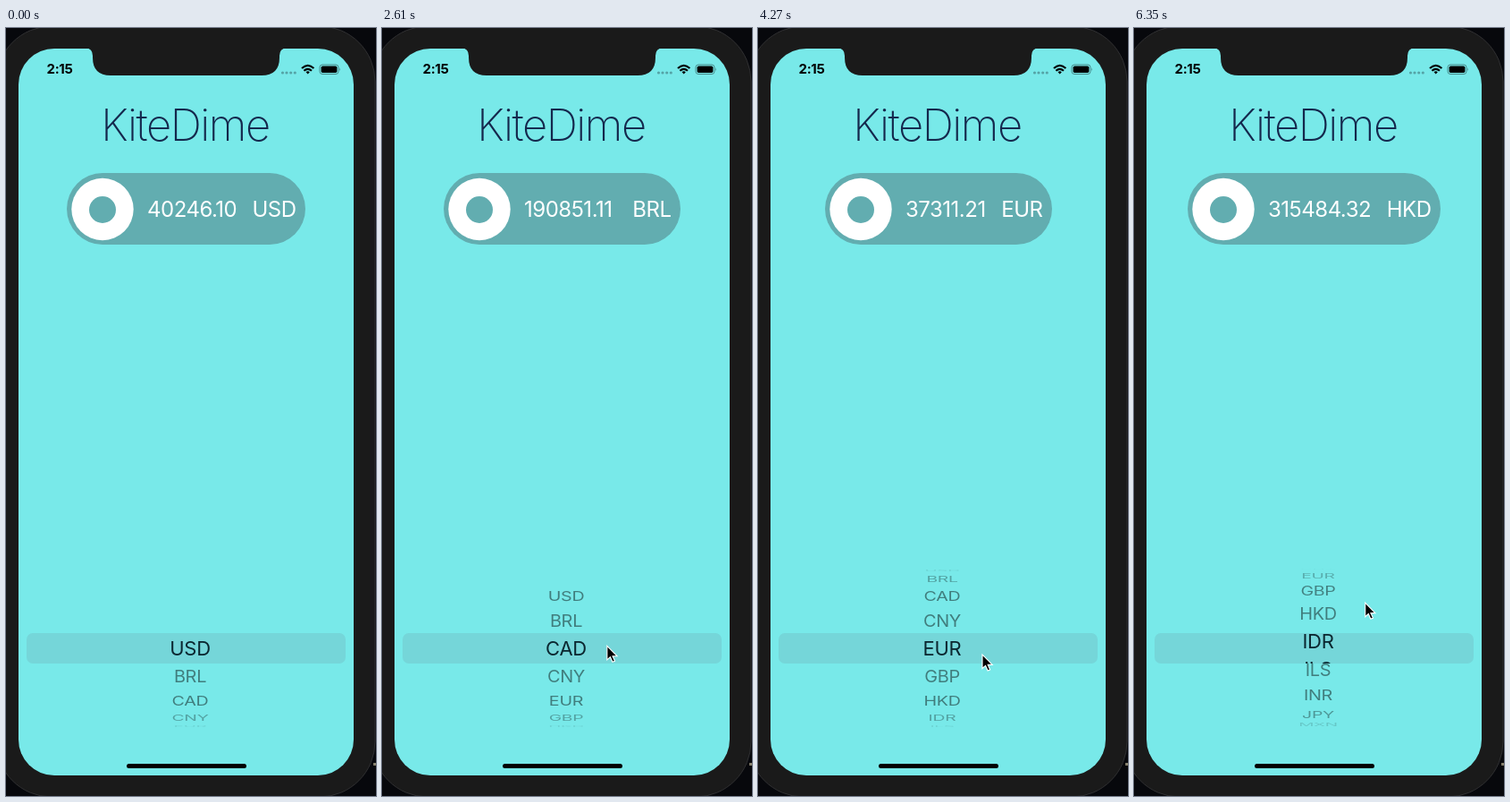
These frames come from a looping animation (414 px wide and 858 px high, 6410 ms). An HTML page:

```html
<!DOCTYPE html>
<html lang="en">
<head>
<meta charset="utf-8">
<title>Currency picker</title>
<style>
  html, body { margin: 0; width: 100%; height: 100%; overflow: hidden; background: #07080c; }
  svg { display: block; width: 100%; height: 100%; }
  text { font-family: Inter, Roboto, sans-serif; }
  .title { font-size: 49px; font-weight: 200; letter-spacing: -1.5px; fill: #14274c; text-anchor: middle; }
  .price { font-size: 24px; letter-spacing: -.5px; fill: #fff; }
  .wheel { text-anchor: middle; letter-spacing: -.3px; }
</style>
</head>
<body>
<svg viewBox="0 0 414 858">
  <defs>
    <clipPath id="inside"><rect x="14" y="676" width="375" height="34"/></clipPath>
    <clipPath id="outside"><path d="M14 603H389V676H14ZM14 710H389V781H14Z"/></clipPath>
  </defs>

  <!-- Phone -->
  <rect x="411" y="821" width="3" height="3" fill="#857f6c"/>
  <rect x="-11" y="-2" width="424" height="861" rx="62" fill="#1a1a1a" stroke="#303032"/>
  <rect x="14" y="23" width="375" height="812" rx="40" fill="#78e9e9"/>
  <path d="M89 22Q97 23 97 31V33Q97 53 117 53H286Q306 53 306 33V31Q306 23 314 22Z" fill="#1a1a1a"/>

  <!-- Status bar -->
  <text x="45.5" y="51" font-size="15" font-weight="700" letter-spacing="-.3">2:15</text>
  <g fill="#55a3a6">
    <circle cx="309.5" cy="50" r="1.6"/><circle cx="314" cy="50" r="1.6"/>
    <circle cx="318.7" cy="50" r="1.6"/><circle cx="323.3" cy="50" r="1.6"/>
  </g>
  <g fill="none" stroke="#000" stroke-width="2.2">
    <path d="M331 45Q337.7 38.6 344.4 45M333.4 47.8Q337.7 43.8 342 47.8"/>
    <path d="M335.6 49.2Q337.7 47.4 339.8 49.2L337.7 51.4Z" fill="#000" stroke="none"/>
  </g>
  <rect x="351" y="41" width="21" height="10.5" rx="3" fill="none" stroke="#478b8c"/>
  <rect x="352.6" y="42.6" width="17.8" height="7.3" rx="1.7"/>
  <path d="M373.3 44.5Q375 46.2 373.3 48Z" fill="#478b8c"/>

  <text class="title" x="200.5" y="125.5">KiteDime</text>

  <!-- Price -->
  <rect id="pill" y="162" height="80" rx="40" fill="#62adb0"/>
  <circle id="disc" cy="202.5" r="34.7" fill="#fff"/>
  <circle id="mark" cy="203" r="15" fill="#62adb0"/>
  <text id="amount" class="price" y="210.5"></text>
  <text id="code" class="price" y="210.5" text-anchor="end"></text>

  <!-- Picker -->
  <rect x="23" y="676" width="357" height="34" rx="7" fill="#75d6d9"/>
  <g class="wheel" id="dim" clip-path="url(#outside)" font-size="20"></g>
  <g class="wheel" id="lit" clip-path="url(#inside)" font-size="22" fill="#0b2730"></g>

  <rect x="135" y="822" width="134" height="5" rx="2.5"/>
  <path id="cursor" d="M0 0V15.5L3.6 12.3L6.1 18L8.7 16.9L6.2 11.4H11.2Z" stroke="#fff" stroke-width="1.1"/>
</svg>
<script>
const LOOP = 6410, MID = 693, RADIUS = 88, STEP = .36;
const codes = 'USD BRL CAD CNY EUR GBP HKD IDR ILS INR JPY MXN'.split(' ');
const $ = id => document.getElementById(id);

// time, amount, code, left edge, width
const prices = [
  [0, '40246.10', 'USD', 68, 267],
  [1700, '190851.11', 'BRL', 69, 265],
  [2650, '50735.80', 'CAD', 66, 271],
  [4120, '37311.21', 'EUR', 75, 254],
  [4830, '30887.38', 'GBP', 68, 267],
  [5950, '315484.32', 'HKD', 60, 283]
];

// time, wheel position
const spin = [
  [0, 0], [890, 0], [1370, 1], [1824, 1], [2304, 2], [2814, 2], [3294, 3],
  [3420, 3], [3900, 4], [4290, 4], [4680, 5], [5180, 5], [5620, 6], [6020, 6], [6450, 7.44]
];

// time, x, y of the pointer tip
const path = [
  [650, 420, 660], [880, 263, 696], [1370, 262, 662], [1824, 260, 696], [2304, 259, 663],
  [2814, 248, 705], [3294, 247, 671], [3420, 250, 702], [3900, 250, 669], [4200, 251, 700],
  [4290, 251, 700], [4680, 251, 668], [5050, 251, 703], [5180, 251, 703], [5620, 252, 670],
  [6020, 257, 682], [6450, 259, 636]
];

function at(keys, t, col) {
  const i = Math.max(1, keys.findIndex(k => k[0] > t));
  const a = keys[i - 1], b = keys[i];
  const u = Math.max(0, (t - a[0]) / (b[0] - a[0]));
  return a[col] + (b[col] - a[col]) * u * u * (3 - 2 * u);
}

function makeRows(group, size) {
  return codes.map(name => {
    const row = document.createElementNS('http://www.w3.org/2000/svg', 'text');
    row.textContent = name;
    row.setAttribute('y', size * .364);
    $(group).append(row);
    return row;
  });
}
const dim = makeRows('dim', 20), lit = makeRows('lit', 22);

function drawWheel(pos) {
  codes.forEach((_, i) => {
    const angle = (i - pos) * STEP, c = Math.cos(angle);
    const show = Math.abs(angle) < 1.55 ? 'inline' : 'none';
    const y = MID + RADIUS * Math.sin(angle);
    dim[i].style.display = lit[i].style.display = show;
    dim[i].setAttribute('transform', `translate(206 ${y}) scale(${.94 + .06 * c} ${c})`);
    dim[i].setAttribute('opacity', .46 * Math.min(1, c * 1.4));
    lit[i].setAttribute('transform', `translate(206 ${y}) scale(1 ${c})`);
  });
}

function drawPrice(t) {
  const [, amount, code, left, width] = prices.filter(p => p[0] <= t).pop();
  $('pill').setAttribute('x', left);
  $('pill').setAttribute('width', width);
  $('disc').setAttribute('cx', left + 40);
  $('mark').setAttribute('cx', left + 40);
  $('amount').setAttribute('x', left + 90);
  $('code').setAttribute('x', left + width - 10.5);
  $('amount').textContent = amount;
  $('code').textContent = code;
}

function frame() {
  const t = performance.now() % LOOP;
  drawWheel(at(spin, t, 1));
  drawPrice(t);
  $('cursor').setAttribute('transform', `translate(${at(path, t, 1)} ${at(path, t, 2)})`);
  requestAnimationFrame(frame);
}
frame();
</script>
</body>
</html>
```
